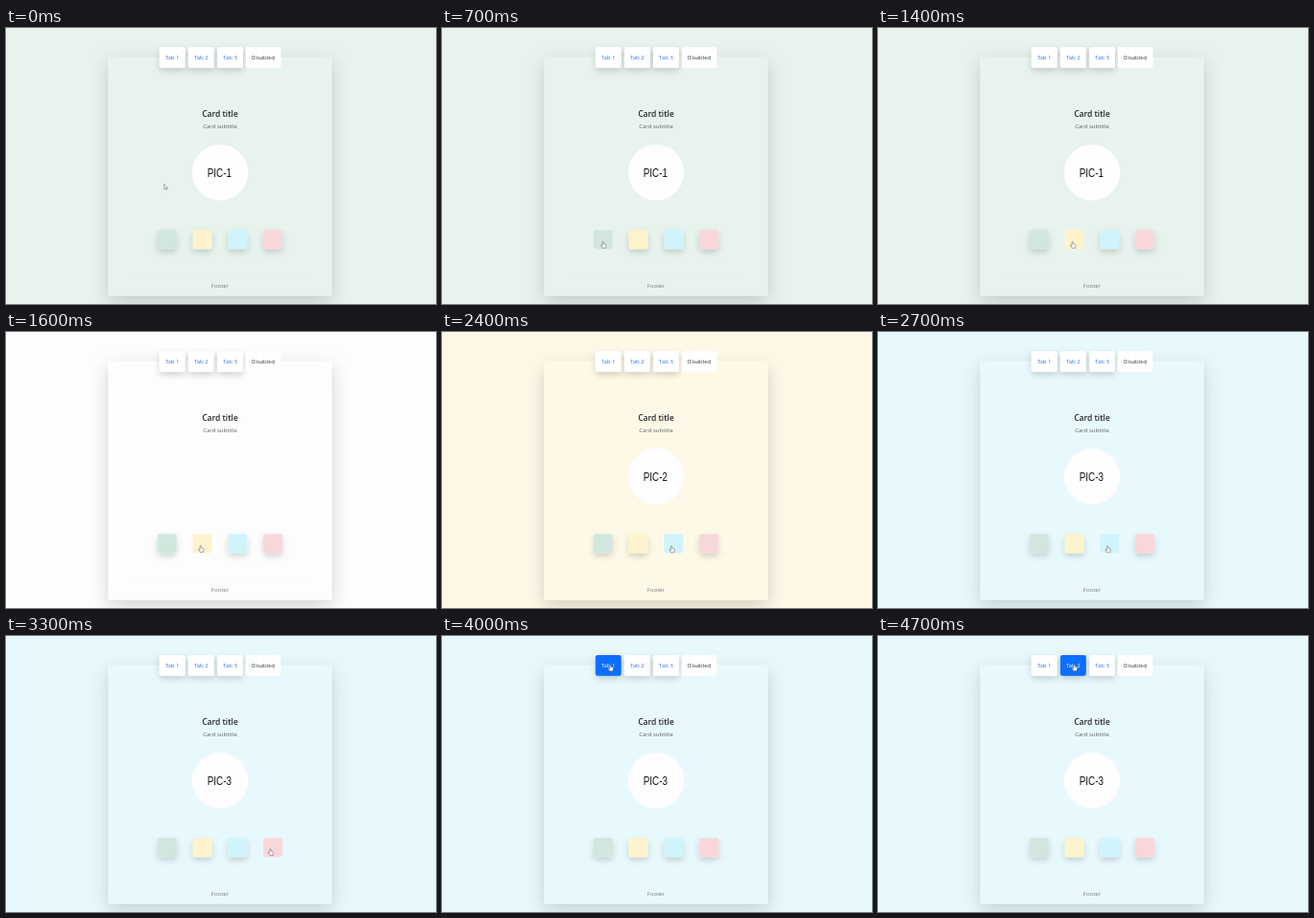
Animation, 450 px wide and 289 px high, one loop 5300 ms. Source, as an HTML page:

```html
<!DOCTYPE html>
<html lang="en">
<head>
<meta charset="utf-8">
<title>Card themes</title>
<style>
  html, body { margin: 0; width: 100%; height: 100%; overflow: hidden; background: #fdfdfe; }
  svg { display: block; width: 100vw; height: 100vh; }
  text { font: 6px "Open Sans", "Noto Sans", sans-serif; text-anchor: middle; }
  .title { font-size: 8.5px; font-weight: 600; fill: #212529; }
  .sub { fill: #585c60; }
  .foot { fill: #73797e; }
  .pic { font: 12px "Liberation Sans", sans-serif; fill: #111; }
</style>
</head>
<body>
<svg id="stage" viewBox="0 0 450 289">
  <defs>
    <filter id="soft" x="-50%" y="-50%" width="200%" height="220%">
      <feDropShadow dx="0" dy="3.2" stdDeviation="3" flood-color="#000" flood-opacity=".17"/>
    </filter>
    <filter id="deep" x="-30%" y="-30%" width="160%" height="160%">
      <feDropShadow dx="0" dy="6.5" stdDeviation="9.5" flood-color="#000" flood-opacity=".17"/>
    </filter>
  </defs>
  <rect id="page" width="450" height="289"/>
  <rect id="card" x="107" y="30.5" width="234" height="250" filter="url(#deep)"/>
  <path d="M135 262.3H313" stroke="#000" stroke-opacity=".03" stroke-width=".6"/>
  <text class="title" x="224" y="93.4">Card title</text>
  <text class="sub" x="224" y="104.8">Card subtitle</text>
  <g id="picture">
    <circle cx="224" cy="151.2" r="29.3" fill="#fefdff"/>
    <g transform="translate(223.3 156.2) scale(.82 1)"><text id="label" class="pic"></text></g>
  </g>
  <text class="foot" x="224" y="272">Footer</text>
  <g id="parts"></g>
  <g id="cursor" stroke-linejoin="round">
    <path id="arrow" d="M0 0V5.2L1.2 4.2L2 6L2.9 5.6L2.1 3.9H3.7Z" fill="#fff" stroke="#555" stroke-width=".5"/>
    <path id="hand" d="M-.6 .4Q0 -.4 .6 .4V2.3L2.7 2.8Q3.4 3 3.3 3.8L2.8 6.8H-.6L-2.2 4.3Q-2.3 3.5 -1.5 3.7L-.6 4.5Z" fill="#fff" stroke="#555" stroke-width=".5"/>
  </g>
</svg>
<script>
const LOOP = 5300, TICK = 100;
const WHITE = [253, 253, 254];
const byId = id => document.getElementById(id);

// Each theme starts on blank white, then fades in.
const themes = [
  { at: -1000, tint: [232, 243, 238] },
  { at: 1600, tint: [254, 249, 231] },
  { at: 2500, tint: [232, 249, 253] }
];
const FADE = 200;

// Cursor stops: time, x, y
const stops = [
  [0, 165.5, 163.6], [100, 165.5, 163.6],
  [700, 168.5, 223.5], [1100, 168.5, 223.5],
  [1400, 203.6, 223.6], [2100, 203.6, 223.6],
  [2400, 240.2, 224], [2700, 240.2, 224],
  [3300, 276.6, 222.8], [3310, 276.6, 222.8],
  [3800, 201, 32], [4000, 176, 30], [4300, 176, 30],
  [4700, 205.2, 29.8], [LOOP, 205.2, 29.8]
];

function make(tag, attrs, text) {
  const el = document.createElementNS("http://www.w3.org/2000/svg", tag);
  for (const k in attrs) el.setAttribute(k, attrs[k]);
  if (text) el.textContent = text;
  byId("parts").append(el);
  return el;
}

function addBox(x, y, width, height, fill) {
  const rect = make("rect", { x, y, width, height, rx: 2.3, fill, filter: "url(#soft)" });
  return { rect, x, y, width, height };
}

const tabs = [1, 2, 3].map((n, i) => {
  const box = addBox(160.6 + i * 30.2, 20, 27, 21.7, "#fff");
  box.text = make("text", { x: box.x + 13.5, y: 33.1 }, "Tab " + n);
  return box;
});
make("rect", { x: 251, y: 20, width: 36.6, height: 21.7, rx: 2.3, fill: "#fefefe" });
make("text", { x: 269.2, y: 33.1, fill: "#3b3f43" }, "Disabled");

const swatches = ["#d1e7dd", "#fff3cd", "#cff4fc", "#f8d7da"]
  .map((fill, i) => addBox(158.6 + i * 36.9, 211.4, 20, 20, fill));

const ease = u => u * u * (3 - 2 * u);
const mix = (a, b, u) => a + (b - a) * u;

function cursorAt(t) {
  let i = 1;
  while (i < stops.length - 1 && stops[i][0] < t) i++;
  const [t0, x0, y0] = stops[i - 1], [t1, x1, y1] = stops[i];
  const u = ease((t - t0) / (t1 - t0));
  return [mix(x0, x1, u), mix(y0, y1, u)];
}

function draw(t) {
  const n = themes.filter(th => th.at <= t).length;
  const { at, tint } = themes[n - 1];
  const shown = Math.min(1, (t - at) / FADE);
  const color = `rgb(${WHITE.map((w, i) => Math.round(mix(w, tint[i], shown)))})`;
  byId("page").setAttribute("fill", color);
  byId("card").setAttribute("fill", color);
  byId("picture").setAttribute("opacity", shown);
  byId("label").textContent = "PIC-" + n;

  const [x, y] = cursorAt(t);
  const over = b => x >= b.x && x <= b.x + b.width && y >= b.y && y <= b.y + b.height;
  for (const tab of tabs) {
    const hot = over(tab);
    tab.rect.setAttribute("fill", hot ? "#0d6efd" : "#fff");
    tab.text.setAttribute("fill", hot ? "#fff" : "#2f74ee");
  }
  for (const s of swatches) s.rect.setAttribute("filter", over(s) ? "none" : "url(#soft)");

  const hand = [...tabs, ...swatches].some(over);
  byId("hand").setAttribute("visibility", hand ? "visible" : "hidden");
  byId("arrow").setAttribute("visibility", hand ? "hidden" : "visible");
  byId("cursor").setAttribute("transform", `translate(${x} ${y})`);
}

const start = performance.now();
function loop() {
  const t = (performance.now() - start) % LOOP;
  draw(Math.floor(t / TICK) * TICK);
  requestAnimationFrame(loop);
}
loop();
</script>
</body>
</html>
```
